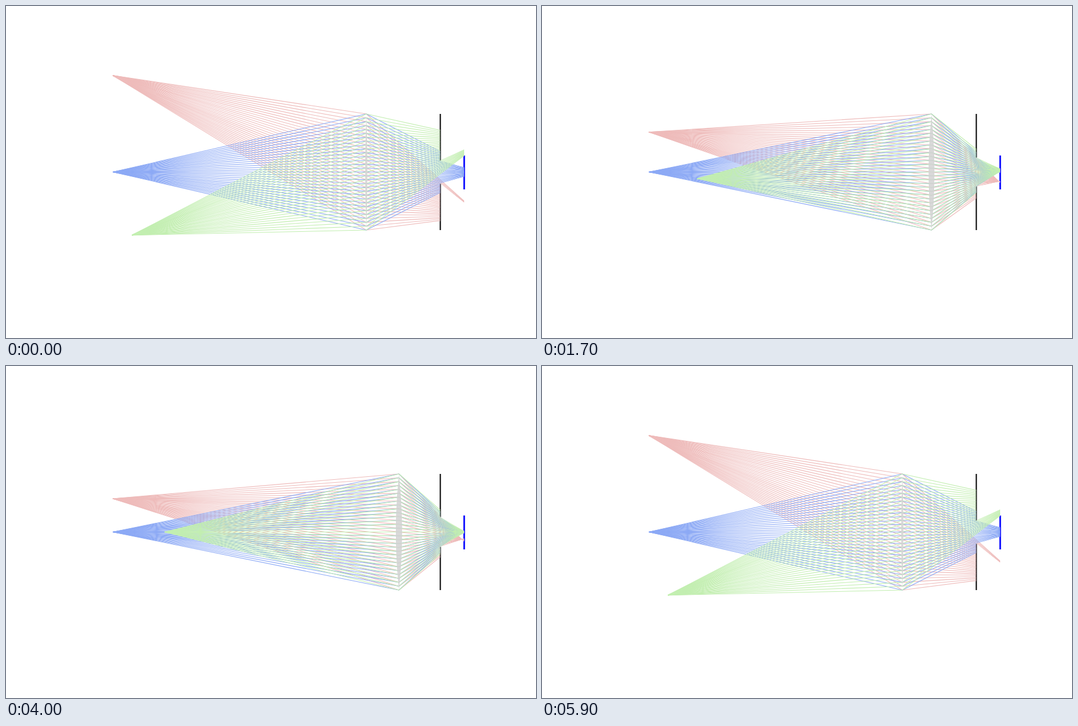
These frames come from a looping animation (900 by 563 pixels, 6900 ms). An HTML page without scripts:

```html
<!DOCTYPE html>
<html lang="en">
<head>
<meta charset="utf-8">
<title>Lens rays</title>
<style>
@property --i { syntax: "<number>"; inherits: true; initial-value: 0; }

html, body { margin: 0; width: 100%; height: 100%; overflow: hidden; background: #fff; }

/* --i: step, --l: lens x, --f: focal length, --g: half the iris opening */
body {
  --l: calc(611.8 + 2.92 * var(--i));
  --f: calc(133.5 - 2.4 * var(--i));
  --g: calc(19.7 + .29 * var(--i));
  animation: dolly 6.9s infinite;
}

@keyframes dolly {
  0% { --i: 0; animation-timing-function: steps(29); }
  42.028% { --i: 29; animation-timing-function: linear; }
  43.478% { --i: 29; animation-timing-function: steps(29); }
  85.506%, 100% { --i: 0; }
}

svg { position: absolute; left: 0; top: 0; width: 900px; height: 563px; }

#fan line { vector-effect: non-scaling-stroke; }

/* --s: source x, --h: its offset from the axis, --d: distance to the lens,
   --q: image distance, --e: image offset, --k: spread from iris to sensor */
.beam {
  --s: 181.5;
  --d: calc(var(--l) - var(--s));
  --q: calc(var(--f) * var(--d) / (var(--d) - var(--f)));
  --e: calc(-1 * var(--h) * var(--q) / var(--d));
  --x: calc(var(--l) + var(--q));
  --k: calc((778 - var(--x)) / (737.5 - var(--x)));
  --mid: calc(281.5 + var(--e) * (1 - var(--k)));
  stroke-width: 1.1;
  clip-path: polygon(
    0 0, 737.5px 0,
    737.5px calc((281.5 - var(--g)) * 1px),
    778px calc((var(--mid) - var(--g) * var(--k)) * 1px),
    778px calc((var(--mid) + var(--g) * var(--k)) * 1px),
    737.5px calc((281.5 + var(--g)) * 1px),
    737.5px 563px, 0 563px);
}
.red { --h: calc(-163.6 + 5.64 * var(--i)); stroke: #eebbba; }
.blue { --h: 0; stroke: #8ca9f5; }
.green { --s: calc(214 + 2.92 * var(--i)); --h: calc(107.1 - 5.64 * var(--i)); stroke: #c2eeb0; }

.in { transform: matrix(var(--d), calc(-1 * var(--h)), 0, 6.567, var(--s), calc(281.5 + var(--h))); }
.out { transform: matrix(calc(-1 * var(--q)), calc(-1 * var(--e)), 0, 6.567, var(--x), calc(281.5 + var(--e))); }

#blade { height: calc((98.5 - var(--g)) * 1px); }
#lens {
  fill: #d3d3d3;
  fill-opacity: .85;
  transform: translate(calc(var(--l) * 1px), 281.5px) scale(calc(4 + .36 * var(--i)), 1);
}
</style>
</head>
<body>
<svg>
  <defs>
    <g id="half">
      <line x2="1" y2="1"/><line x2="1" y2="2"/><line x2="1" y2="3"/>
      <line x2="1" y2="4"/><line x2="1" y2="5"/><line x2="1" y2="6"/>
      <line x2="1" y2="7"/><line x2="1" y2="8"/><line x2="1" y2="9"/>
      <line x2="1" y2="10"/><line x2="1" y2="11"/><line x2="1" y2="12"/>
      <line x2="1" y2="13"/><line x2="1" y2="14"/><line x2="1" y2="15"/>
    </g>
    <g id="fan">
      <line x2="1"/>
      <g id="lower">
        <line x2="1" y2="1"/><line x2="1" y2="2"/><line x2="1" y2="3"/>
        <line x2="1" y2="4"/><line x2="1" y2="5"/><line x2="1" y2="6"/>
        <line x2="1" y2="7"/><line x2="1" y2="8"/><line x2="1" y2="9"/>
        <line x2="1" y2="10"/><line x2="1" y2="11"/><line x2="1" y2="12"/>
        <line x2="1" y2="13"/><line x2="1" y2="14"/><line x2="1" y2="15"/>
      </g>
      <use href="#lower" transform="scale(1 -1)"/>
    </g>
    <g id="cross">
      <use href="#fan"/>
      <use href="#fan" transform="scale(-1)"/>
    </g>
  </defs>
  <rect x="776.7" y="253.5" width="2.7" height="57.5" fill="#00f"/>
  <rect id="blade" x="736.5" y="183" width="2" height="79"/>
  <use href="#blade" transform="matrix(1 0 0 -1 0 563)"/>
</svg>
<svg class="beam red"><use class="in" href="#fan"/><use class="out" href="#cross"/></svg>
<svg class="beam blue"><use class="in" href="#fan"/><use class="out" href="#cross"/></svg>
<svg class="beam green"><use class="in" href="#fan"/><use class="out" href="#cross"/></svg>
<svg><path id="lens" d="M0-98.5Q1 0 0 98.5Q-1 0 0-98.5"/></svg>
</body>
</html>
```
